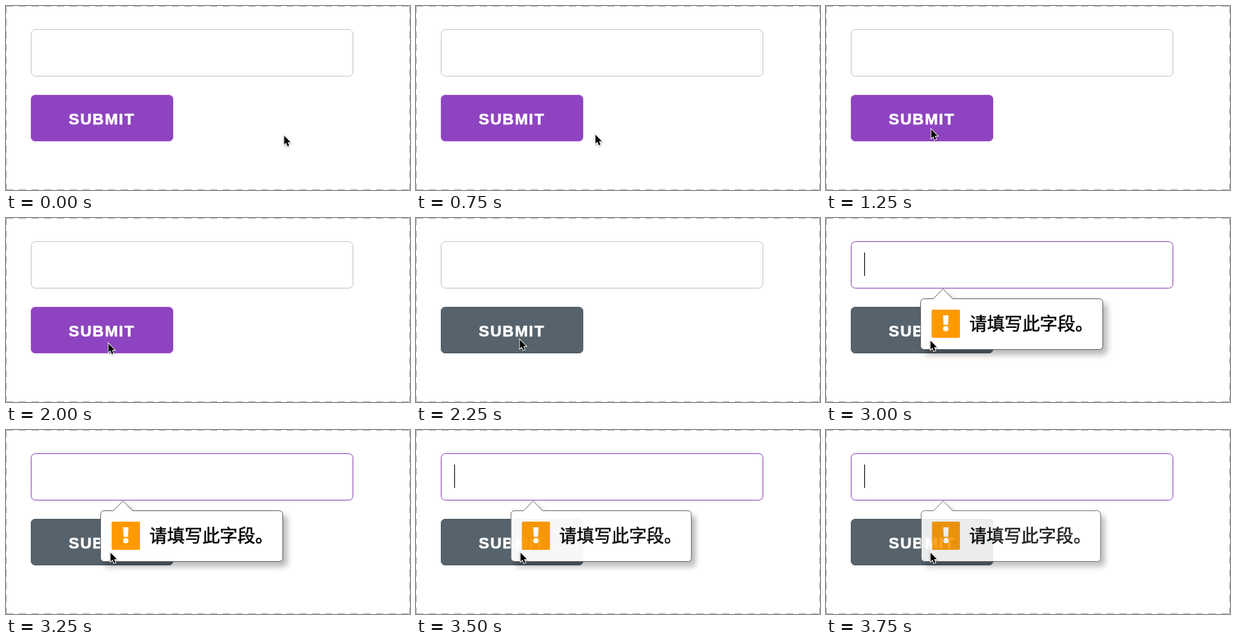
Animation, 570 px wide and 261 px high, one loop 4 s. Source, as an HTML page:

```html
<!DOCTYPE html>
<html lang="zh">
<head>
<meta charset="utf-8">
<title>Required field</title>
<style>
  html, body { margin: 0; width: 100%; height: 100%; overflow: hidden; background: #fff; }
  svg { display: block; }
  #edge { fill: none; stroke: #b2b2b2; stroke-dasharray: 10 8; }
  #field { fill: #fff; stroke: #c6c6c6; }
  #field.focus { stroke: #8f45b8; }
  #button { fill: #8e43c1; stroke: #9a55c8; }
  #button.hover { fill: #56636c; stroke: #4d5a63; }
  #label {
    font: bold 22px "Liberation Sans", Arial, sans-serif; letter-spacing: 1.5px;
    fill: #fff; stroke: #fff; stroke-width: .6;
  }
  #bubble { transform-origin: 185px 150px; filter: drop-shadow(6px 7px 4px rgba(0, 0, 0, .28)); }
  #bubble text {
    font: 24.9px "Noto Sans CJK SC", "Noto Sans CJK", sans-serif;
    stroke: #000; stroke-width: .5;
  }
  #cursor { filter: drop-shadow(0 1px 1px rgba(0, 0, 0, .35)); }
</style>
</head>
<body>
<svg width="570" height="261" viewBox="0 0 570 261">
  <path id="edge" d="M0 .5H570M0 260.5H570M.5 0V261M569.5 0V261"/>
  <rect id="field" x="35.5" y="33.5" width="454" height="66" rx="6"/>
  <rect id="caret" x="54" y="49" width="1" height="33"/>
  <rect id="button" x="35.5" y="126.5" width="200" height="65" rx="5.5"/>
  <text id="label" x="88.5" y="168">SUBMIT</text>
  <g id="bubble">
    <path d="M138.5 114.5H151.5L165 100.5L178.5 114.5H385.5a5 5 0 0 1 5 5V181.5a5 5 0 0 1 -5 5H138.5a5 5 0 0 1 -5 -5V119.5a5 5 0 0 1 5 -5Z" fill="#fff" stroke="#666"/>
    <rect x="149" y="130" width="40" height="40" rx="2" fill="#f90"/>
    <path d="M165.2 138h7.6l-.6 13.5h-6.4Z" fill="#fff"/>
    <circle cx="169" cy="157" r="3.8" fill="#fff"/>
    <text x="202.3" y="159.3">请填写此字段。</text>
  </g>
  <path id="cursor" d="M1.5 2V14.6L4.3 12L6.3 17L8.5 16.1L6.5 11.3H10.4Z" stroke="#fff" stroke-width="1.8" paint-order="stroke"/>
</svg>
<script>
  const LOOP = 4000, STEP = 250;
  const HOVER = 2250, FOCUS = 2750;
  const CARET_OFF = 3250, CARET_ON = 3500;

  // Pointer position per step; the last one holds.
  const pointer = [
    [391, 182], [345, 161], [340, 154], [251.7, 180.5], [149, 178],
    [147, 173], [91, 116], [143, 176], [143, 176], [145, 170.5], [146, 172]
  ];
  // Bubble [opacity, horizontal scale] per step from FOCUS on.
  const bubblePulse = [[.81, .9805], [1, 1], [1, 1], [.95, .99], [.88, .985]];

  const el = id => document.getElementById(id);
  const [field, caret, button, bubble, cursor] =
    ["field", "caret", "button", "bubble", "cursor"].map(el);
  const show = (node, on) => { node.style.visibility = on ? "visible" : "hidden"; };

  function draw(time) {
    const t = Math.floor(time % LOOP / STEP) * STEP;
    const [x, y] = pointer[Math.min(t / STEP, pointer.length - 1)];
    cursor.setAttribute("transform", `translate(${x} ${y})`);

    const focused = t >= FOCUS;
    button.classList.toggle("hover", t >= HOVER);
    field.classList.toggle("focus", focused);
    show(caret, focused && (t < CARET_OFF || t >= CARET_ON));
    show(bubble, focused);
    if (focused) {
      const [opacity, scale] = bubblePulse[(t - FOCUS) / STEP];
      bubble.style.opacity = opacity;
      bubble.style.transform = `scaleX(${scale})`;
    }
  }

  const start = performance.now();
  function tick() {
    draw(performance.now() - start);
    requestAnimationFrame(tick);
  }
  tick();
</script>
</body>
</html>
```
